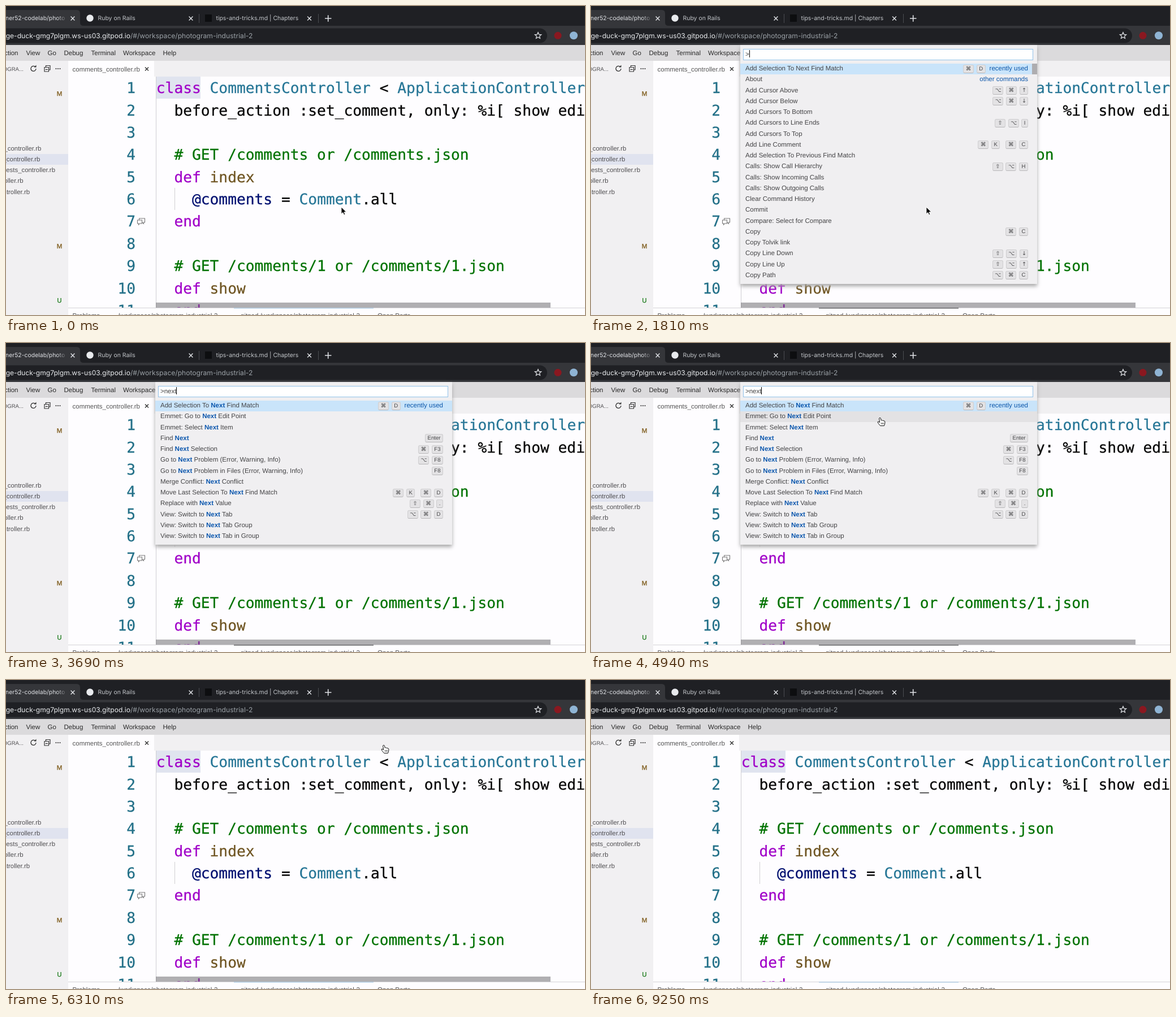
These frames come from a looping animation (1024 px wide and 547 px high, 9.31 s). An HTML page:

```html
<!DOCTYPE html>
<html lang="en">
<head>
<meta charset="utf-8">
<title>Command palette</title>
<style>
  html, body { margin: 0; width: 100%; height: 100%; overflow: hidden; background: #fefdff; }
  body { position: relative; text-rendering: geometricPrecision; }
  svg { position: absolute; left: 0; top: 0; width: 1024px; height: 547px; overflow: hidden; }
  text { white-space: pre; }
  .ui, #palette { font: 11.5px "Liberation Sans", Arial, sans-serif; }
  .chrome { font-family: Inter, sans-serif; font-size: 10.45px; }
  .code { font: 26.24px "DejaVu Sans Mono", monospace; stroke-width: .3px; }
  #palette { position: absolute; left: 264px; top: 69px; width: 524.5px; color: #444446;
    background: #f0eff1; padding: 32.5px 0 5.5px; box-sizing: border-box; box-shadow: 0 4px 6.6px #a8a8a8; }
  #input { position: absolute; left: 5px; top: 7px; width: 508px; height: 18px; line-height: 18px;
    padding-left: 3px; background: #fff; border: 1px solid #92c2e8; color: #444; }
  #caret { display: inline-block; width: 1px; height: 13px; background: #000; vertical-align: -2px; }
  .row { display: flex; align-items: center; height: 19.25px; padding: 0 15.5px 0 9px; white-space: pre; }
  .row.on { background: #c9e4fa; }
  .row.hover { background: #e3e2e4; }
  .row b { color: #0a56ad; }
  .keys { margin-left: auto; display: flex; }
  .keys i { font: 9.6px/13px "Liberation Sans", "DejaVu Sans", sans-serif; height: 13px; padding: 0 3.5px;
    margin-left: 4.7px; border: 1px solid #cfced0; border-bottom-color: #b9b8ba; border-radius: 3px;
    background: #e3e2e4; color: #444446; text-align: center; }
  .keys i.sym { font-family: "DejaVu Sans", sans-serif; width: 10px; }
  .keys i.arrow { font-family: "DejaVu Sans", sans-serif; width: 6.5px; }
  .keys i.chord { margin-left: 10px; }
  .note { color: #0b56aa; margin-left: 7px; }
  #thumb { position: absolute; right: 0; top: 32.5px; width: 8.5px; height: 19px; background: #aeadb0; }
</style>
</head>
<body>
<svg id="stage"></svg>
<div id="palette"></div>
<svg>
  <g id="pointer">
    <path id="arrow" d="M0 0V12.2L2.9 9.5 4.8 13.8 6.8 12.9 5 8.8H9Z" stroke="#fff" stroke-width=".9"/>
    <g id="hand" fill="#fff" stroke="#111" stroke-width="1" stroke-linejoin="round">
      <path d="M-1.4 1.2Q0-.8 1.4 1.2L2.2 5Q3.6 4 4.7 5.4 6 4.6 7 6 8.6 5.6 8.9 7.4L8.6 11 7.5 14.5H.6L-2.6 10.6-4 8Q-3.6 6.4-2 7.4L-.4 8.6Z"/>
      <path d="M2.4 9V12M4.4 9V12M6.2 9V12" stroke-width=".7"/>
    </g>
  </g>
</svg>
<script>
const LOOP = 9310, OPEN = 1400, CLOSE = 5900, TYPED = [2250, 2400, 2520, 2650], QUERY = 'next';
const POINTER_BACK = 4050, POINTER_GONE = 7150;
const ROW = 19.25, FIRST_ROW = 101.5;
const $ = id => document.getElementById(id);

// Static screen
const rect = (x, y, w, h, fill, more = '') => `<rect x="${x}" y="${y}" width="${w}" height="${h}" fill="${fill}" ${more}/>`;
const text = (x, y, s, fill, cls = 'ui', more = '') => `<text x="${x}" y="${y}" fill="${fill}" class="${cls}" ${more}>${s.replace(/</g, '&lt;')}</text>`;
const code = (x, y, s, fill, more = '') => text(x, y, s, fill, 'code', `stroke="${fill}" ${more}`);
const line = (d, stroke, w = 1) => `<path d="${d}" fill="none" stroke="${stroke}" stroke-width="${w}"/>`;
const dot = (x, y, r, fill) => `<circle cx="${x}" cy="${y}" r="${r}" fill="${fill}"/>`;
const cross = (x, y, r, color) => line(`M${x - r} ${y - r}l${2 * r} ${2 * r}m0 ${-2 * r}l${-2 * r} ${2 * r}`, color, 1.4);

function browser() {
  const pale = '#dfe1e5', grey = '#9aa0a6';
  const star = [...Array(10)].map((_, i) => {
    const a = i * Math.PI / 5, r = i % 2 ? 2.7 : 6;
    return `${941 + r * Math.sin(a)},${52.5 - r * Math.cos(a)}`;
  }).join(' ');
  return rect(0, 0, 1024, 69, '#1f2024') + rect(0, 35, 1024, 34, '#35363a') +
    `<path d="M0 7H125Q131 7 131 13V29Q131 35 137 35H0Z" fill="#35363a"/>` +
    text(-1, 25.3, 'ner52-codelab/photo', pale, 'chrome') + rect(90, 12, 19, 20, 'url(#fade)') +
    cross(118, 22, 3.4, pale) + cross(327, 22, 3.4, pale) + cross(536.5, 22, 3.4, pale) +
    dot(148.5, 21.5, 6.2, '#e8eaed') + text(162.5, 25.3, 'Ruby on Rails', '#c3c6ca', 'chrome') +
    rect(352, 15, 12, 13, '#0d0e10') + text(371.5, 25.3, 'tips-and-tricks.md | Chapters', '#c3c6ca', 'chrome') +
    line('M341.5 14V30M552.5 14V30', '#4a4c51') + line('M564 22H575.5M569.7 16.3V27.7', pale, 1.6) +
    rect(-30, 39.5, 987, 26, '#1f2024', 'rx="13"') +
    text(220, 56.7, 'ge-duck-gmg7plgm.ws-us03.gitpod.io', '#e8eaed', 'chrome', 'text-anchor="end" style="font-size:12.1px"') +
    text(220, 56.7, '/#/workspace/photogram-industrial-2', grey, 'chrome', 'style="font-size:12.1px"') +
    `<polygon points="${star}" fill="none" stroke="${pale}" stroke-width="1.2"/>` +
    dot(976, 52.3, 6.5, '#8a1820') + dot(1004, 52.3, 7, '#8fb4d4');
}

function sidebar() {
  const ink = '#504f52';
  const files = ['application', 'comments', 'follow_requests', 'likes', 'photos'];
  return rect(0, 69, 1024, 28, '#dbdadc') +
    text(21.5, 87, 'Selection', '#2a2a2a', 'ui', 'text-anchor="end"') +
    [['View', 35.5], ['Go', 73.5], ['Debug', 102.5], ['Terminal', 150.5], ['Workspace', 207], ['Help', 277.5]]
      .map(([s, x]) => text(x, 87, s, '#2a2a2a')).join('') +
    rect(0, 97, 110, 450, '#f1f0f2') + rect(0, 262, 110, 19, '#e0e3ef') +
    text(31, 114.7, 'PHOTOGRA...', ink, 'ui', 'text-anchor="end" style="font-size:9.6px"') +
    files.map((f, i) => text(-58, 255.5 + i * 19.25, f + '_controller.rb', ink, 'ui', 'style="font-size:11.4px"')).join('') +
    line('M51.5 107.5A4.5 4.5 0 1 0 53 111', '#333', 1.3) + '<path d="M49.5 108.5h4v-4z" fill="#333"/>' +
    line('M70.5 108V105.5H78V113H75.5M68 108.5H75.5V116H68ZM69.8 112.3H73.8', '#333', 1.2) +
    [88.5, 92, 95.5].map(x => dot(x, 111, 1.1, '#333')).join('') +
    [['M', 159, '#7d5a1a'], ['M', 429, '#7d5a1a'], ['U', 525, '#1b7a1b']]
      .map(([s, y, c]) => text(94.5, y, s, c, 'ui', `text-anchor="middle" stroke="${c}" stroke-width=".3"`)).join('');
}

function editor() {
  const key = '#a000c8', type = '#267696', fn = '#6f5522', note = '#007200', ink = '#050505';
  const tokens = [
    [1, 0, key, 'class'], [1, 6, type, 'CommentsController'], [1, 25, ink, '<'], [1, 27, type, 'ApplicationController'],
    [2, 2, ink, 'before_action :set_comment, only: %i[ show edit update'],
    [4, 2, note, '# GET /comments or /comments.json'],
    [5, 2, key, 'def'], [5, 6, fn, 'index'],
    [6, 4, '#001070', '@comments'], [6, 14, ink, '='], [6, 16, type, 'Comment'], [6, 23, ink, '.all'],
    [7, 2, key, 'end'],
    [9, 2, note, '# GET /comments/1 or /comments/1.json'],
    [10, 2, key, 'def'], [10, 6, fn, 'show'], [11, 2, key, 'end']
  ];
  const base = n => 154.2 + (n - 1) * 39.38;
  return rect(110, 97, 914, 28, '#f1f0f2') + rect(110, 97, 152, 29, '#fefdff') +
    text(117.5, 115.5, 'comments_controller.rb', '#555') + cross(249, 111.5, 3, '#333') +
    rect(110, 125, 914, 409, '#fefdff') + rect(266, 125, 78, 39, '#e0e4ef') +
    line('M265.5 125V534M298.5 322V361', '#d0cfd2') +
    [...Array(11)].map((_, i) => code(229, base(i + 1), `${i + 1}`, '#237088', 'text-anchor="end"')).join('') +
    tokens.map(([n, col, c, s]) => code(265.8 + col * 15.797, base(n), s, c)).join('') +
    `<g id="bubbles" fill="#fefdff" stroke="#777" stroke-width="1.1"><path d="M235.5 376H245.5V383H243.5V385.5L241 383H235.5Z"/><path d="M232.5 379H240.5V385H236.5L234.5 387.3V385H232.5Z"/></g>` +
    rect(265, 525, 698, 9, '#646366', 'id="bar"');
}

function panel() {
  const names = [['Problems', 117.5], ['/workspace/photogram-industrial-2', 198],
    ['gitpod /workspace/photogram-industrial-2', 415], ['Open Ports', 657]];
  return rect(110, 534, 914, 13, '#fefdff') + line('M110 534.5H1024', '#d4d3d6') +
    rect(403, 534.3, 247, 1.2, '', 'id="focus"') +
    names.map(([s, x]) => text(x, 552, s, '#504f52')).join('');
}

$('stage').innerHTML = '<defs><linearGradient id="fade"><stop stop-color="#35363a" stop-opacity="0"/><stop offset="1" stop-color="#35363a"/></linearGradient></defs>' +
  browser() + sidebar() + editor() + panel();

// Command palette: name, then its keys; "/" splits a chord
const commands = `Add Selection To Next Find Match|⌘ D
About
Add Cursor Above|⌥ ⌘ ↑
Add Cursor Below|⌥ ⌘ ↓
Add Cursors To Bottom
Add Cursors to Line Ends|⇧ ⌥ I
Add Cursors To Top
Add Line Comment|⌘ K / ⌘ C
Add Selection To Previous Find Match
Calls: Show Call Hierarchy|⇧ ⌥ H
Calls: Show Incoming Calls
Calls: Show Outgoing Calls
Clear Command History
Commit
Compare: Select for Compare
Copy|⌘ C
Copy Tolvik link
Copy Line Down|⇧ ⌥ ↓
Copy Line Up|⇧ ⌥ ↑
Copy Path|⌥ ⌘ C
Emmet: Go to Next Edit Point
Emmet: Select Next Item
Find Next|Enter
Find Next Selection|⌘ F3
Go to Next Problem (Error, Warning, Info)|⌥ F8
Go to Next Problem in Files (Error, Warning, Info)|F8
Merge Conflict: Next Conflict
Move Last Selection To Next Find Match|⌘ K / ⌘ D
Replace with Next Value|⇧ ⌘ .
View: Switch to Next Tab|⌥ ⌘ D
View: Switch to Next Tab Group
View: Switch to Next Tab in Group`.split('\n').map(s => s.split('|'));

function keyCaps(keys) {
  let chord = '';
  return keys.split(' ').map(k => {
    if (k === '/') { chord = ' chord'; return ''; }
    const kind = '⌘⌥⇧'.includes(k) ? 'sym' : '↑↓'.includes(k) ? 'arrow' : '';
    const cap = `<i class="${kind}${chord}">${k}</i>`;
    chord = '';
    return cap;
  }).join('');
}

function drawPalette(query, hover) {
  const rows = commands.filter(([name]) => name.toLowerCase().includes(query)).slice(0, 20);
  $('palette').innerHTML = `<div id="input">&gt;${query}<span id="caret"></span></div>` +
    rows.map(([name, keys], i) => {
      const label = query ? name.replace(new RegExp(query, 'i'), '<b>$&</b>') : name;
      const note = i === 0 ? 'recently used' : i === 1 && !query ? 'other commands' : '';
      return `<div class="row ${i === 0 ? 'on' : i === hover ? 'hover' : ''}"><span>${label}</span>` +
        `<span class="keys">${keys ? keyCaps(keys) : ''}</span>${note && `<span class="note">${note}</span>`}</div>`;
    }).join('') + (rows.length === 20 ? '<div id="thumb"></div>' : '');
}

// Motion
const route = [[0, 593, 356], [POINTER_BACK, 593, 356], [4700, 511, 132], [5000, 511, 132],
  [5600, 668, 115], [6700, 668, 115], [POINTER_GONE, 1035, 118], [LOOP, 1035, 118]];

function pointerAt(t) {
  const i = route.findIndex(p => p[0] > t);
  const [t0, x0, y0] = route[i - 1], [t1, x1, y1] = route[i];
  const u = (t - t0) / (t1 - t0), e = u * u * (3 - 2 * u);
  return [x0 + (x1 - x0) * e, y0 + (y1 - y0) * e];
}

const show = (id, on) => { $(id).style.display = on ? '' : 'none'; };
let drawn = '';

function frame(now) {
  const t = now % LOOP;
  const open = t >= OPEN && t < CLOSE;
  const count = TYPED.filter(k => k <= t).length;
  const [x, y] = pointerAt(t);
  const hand = t > POINTER_BACK + 100;

  show('palette', open);
  $('focus').setAttribute('fill', open ? '#454547' : '#a3c4de');
  if (open) {
    const hover = hand ? Math.floor((y - FIRST_ROW) / ROW) : -1;
    const state = count + ':' + hover;
    if (state !== drawn) drawPalette(QUERY.slice(0, count), hover);
    drawn = state;
    const since = t - (count ? TYPED[count - 1] : OPEN);
    $('caret').style.opacity = since % 1000 < 500 ? 1 : 0;
  }

  show('pointer', t < TYPED[0] || (t >= POINTER_BACK && t < POINTER_GONE));
  show('arrow', !hand);
  show('hand', hand);
  $('pointer').setAttribute('transform', `translate(${x} ${y})`);
  show('bubbles', t < 7000);
  $('bar').setAttribute('opacity', 0.5 * Math.min(1, Math.max(0, (8200 - t) / 800)));
  requestAnimationFrame(frame);
}
requestAnimationFrame(frame);
</script>
</body>
</html>
```
